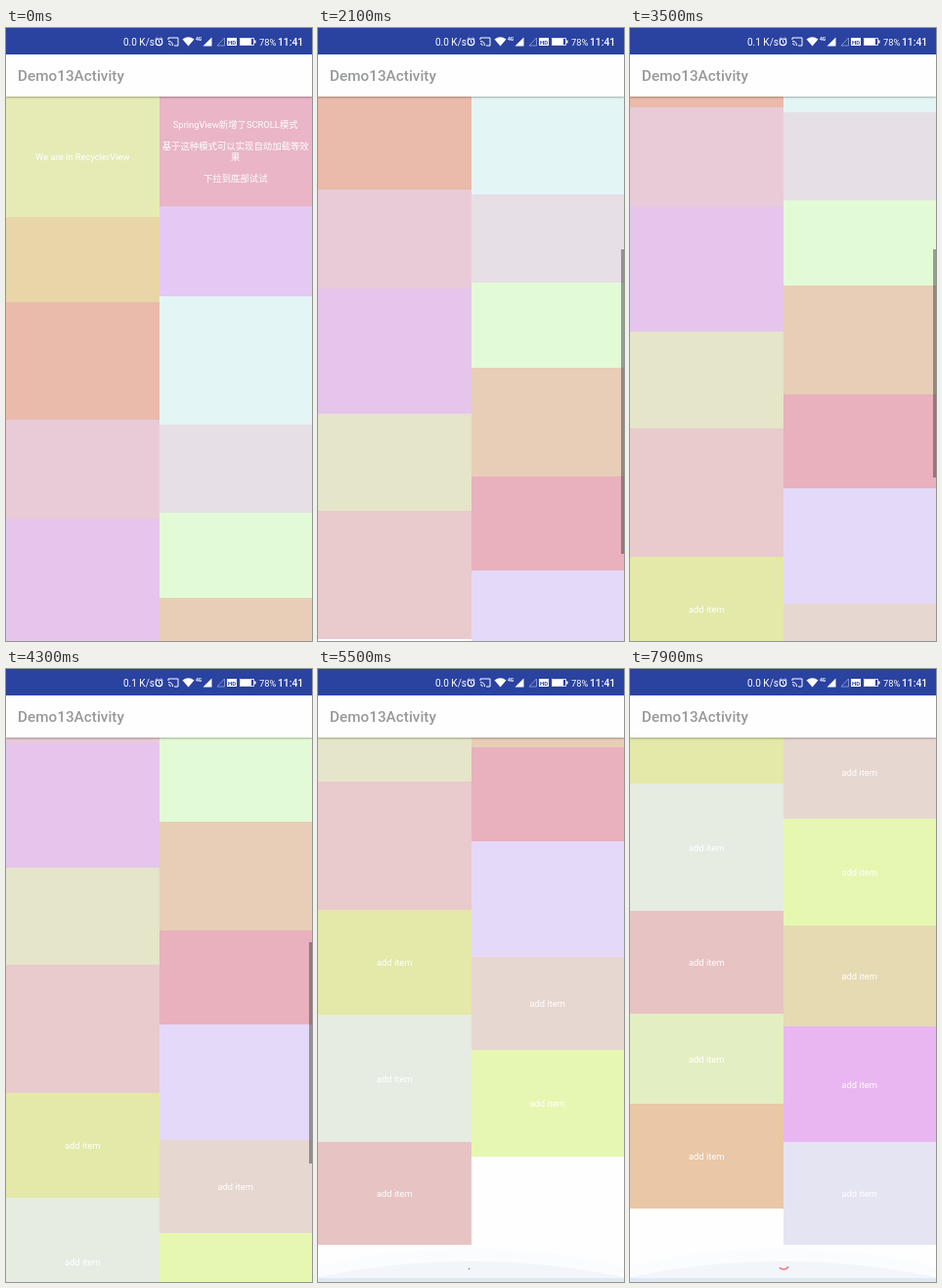
Recreate the animation shown at these times as an HTML page. Size 313x626 px, loop 8 s.

```html
<!DOCTYPE html>
<html lang="zh">
<head>
<meta charset="utf-8">
<style>
  html, body { margin: 0; width: 100%; height: 100%; overflow: hidden; background: #fdfefd; }
  body { font-family: Roboto, "Noto Sans CJK SC", "Noto Sans CJK", sans-serif; }
  #stage { position: absolute; left: 0; top: 0; width: 313px; height: 626px; overflow: hidden; }
  #list { position: absolute; left: 0; top: 0; width: 313px; }
  .item {
    position: absolute; width: 156.5px; display: flex; align-items: center; justify-content: center;
    color: #fff; font-size: 9.4px; line-height: 11px; text-align: center; white-space: pre;
  }
  #footer { position: absolute; left: 0; width: 313px; height: 38px; }
  #thumb { position: absolute; left: 310px; top: 0; width: 3px; background: rgba(50, 50, 50, .45); }
  #bar {
    position: absolute; left: 0; top: 27px; width: 313px; height: 43px; background: #fdfefd;
    box-shadow: 0 1px 2px rgba(0, 0, 0, .3);
  }
  #bar span {
    position: absolute; left: 12px; top: 0; line-height: 44px;
    font-size: 15.3px; font-weight: 500; color: #989a9a;
  }
  #status { position: absolute; left: 0; top: 0; background: #2a42a0; }
  #status text { fill: #fff; }
</style>
</head>
<body>
<div id="stage">
  <div id="list">
    <svg id="footer" viewBox="0 0 313 38">
      <path d="M0 22Q156.5 -14 313 22V38H0z" fill="#fafcfd"/>
      <path d="M0 33Q156.5 1 313 33V38H0z" fill="#f2f6fa"/>
      <rect y="34" width="313" height="4" fill="#e2e8f2"/>
      <path id="arc" fill="none" stroke-width="1.5"/>
    </svg>
  </div>
  <div id="thumb"></div>
  <div id="bar"><span>Demo13Activity</span></div>
  <svg id="status" width="313" height="27">
    <text id="speed" x="120" y="17.5" font-size="10">0.0 K/s</text>
    <g fill="none" stroke="#fff">
      <circle cx="156.5" cy="14.3" r="3.3" stroke-width="1.2"/>
      <path d="M156.5 12.3v2.2l1.5 1M152.6 11.6l2-1.8M160.4 11.6l-2-1.8"/>
      <path d="M166 12v-2h10v8h-4M166 13.5q4.500 0 4.500 4.500M166 15.800q2.200 0 2.200 2.200"/>
      <path d="M216 18h7.500v-8z" stroke="#9aa6d6" stroke-width=".8"/>
      <rect x="239.500" y="10.500" width="14" height="7" stroke-width=".8"/>
    </g>
    <g fill="#fff">
      <path d="M180.500 11.500q6-4.500 12 0l-6 7z"/>
      <path d="M201.500 18.500h9v-9z"/>
      <rect x="226" y="10" width="10" height="8"/>
      <rect x="240" y="11" width="11" height="6"/>
      <rect x="254" y="12.500" width="1.500" height="3"/>
    </g>
    <text x="194" y="13" font-size="5" font-weight="700">4G</text>
    <text x="227" y="16.500" font-size="6" font-weight="700" style="fill:#2a42a0">HD</text>
    <text x="259" y="17.500" font-size="9.4">78%</text>
    <text x="278" y="17.500" font-size="10.300" font-weight="500">11:41</text>
  </svg>
</div>
<script>
const $ = id => document.getElementById(id);
const list = $('list'), footer = $('footer'), thumb = $('thumb'), arc = $('arc'), speed = $('speed');
const LOOP = 8000, TOP = 70;

// Each column: [height, colour]
const left = [
  [123, '#e6ebb6'], [87, '#e8d6a9'], [120, '#eabaaa'], [101, '#e8cbd7'], [128, '#e6c5ec'],
  [99, '#e5e5ca'], [131, '#e9cacd'], [107, '#e4e8a8'], [130, '#e6ece2'], [105, '#e8c3c4'],
  [92, '#e4eec3'], [107, '#e9c7a7']
];
const right = [
  [112, '#e9b5c7'], [92, '#e5c9f4'], [131, '#e4f5f6'], [90, '#e6dfe6'], [87, '#e3fad6'],
  [111, '#e8ceb7'], [96, '#e9b1bd'], [118, '#e5d9f9'], [95, '#e7d7d1'], [109, '#e6f7b2'],
  [103, '#e5dab2'], [118, '#e9b6f2'], [105, '#e5e4f2']
];
const intro = 'SpringView新增了SCROLL模式\n\n基于这种模式可以实现自动加载等效\n果\n\n下拉到底部试试';

// Three batches of items; each one ends with the loading footer
const ends = [907, 1201, 1437];
const loads = [0, 3350, 5850];
const batches = [[], [], []];

function addColumn(rows, x, firstText, firstAdded, counts) {
  let y = TOP;
  rows.forEach(([h, color], i) => {
    const el = document.createElement('div');
    const batch = i < firstAdded ? 0 : i < firstAdded + counts ? 1 : 2;
    el.className = 'item';
    el.style.cssText = `left:${x}px;top:${y}px;height:${h}px;background:${color}`;
    el.textContent = i === 0 ? firstText : batch ? 'add item' : '';
    list.append(el);
    batches[batch].push(el);
    y += h;
  });
}
addColumn(left, 0, 'We are in RecyclerView', 7, 3);
addColumn(right, 156.5, intro, 8, 2);

const clamp = v => Math.max(0, Math.min(1, v));
const easeOut = u => 1 - (1 - u) ** 2;
const easeSpin = u => { const s = u ** .6; return s * s * (3 - 2 * s); };

// Flings: [start, duration, distance]
const flings = [[1750, 723, 319], [4220, 402, 294], [6700, 345, 236]];
const scrollAt = t => flings.reduce((s, [t0, d, px]) => s + px * easeOut(clamp((t - t0) / d)), 0);

// Scrollbar: [appears, starts to fade, gone]
const shows = [[1750, 2750, 3000], [3350, 3700, 4000], [4220, 4850, 5100], [5850, 6150, 6400], [6700, 7300, 7550]];
const bars = [[.667, 311], [.49, 233], [.403, 175]];

// Spinner: [start, base angle, colour]
const spins = [[2150, 0, '#e8595f'], [4230, -22, '#666a72'], [6950, 52, '#f0777a']];

function arcPath(from, to) {
  const point = a => {
    const r = a * Math.PI / 180;
    return `${(157 + 6 * Math.cos(r)).toFixed(2)} ${(19 + 6 * Math.sin(r)).toFixed(2)}`;
  };
  return `M${point(from)}A6 6 0 ${to - from > 180 ? 1 : 0} 1 ${point(to)}`;
}

function render(t) {
  const scroll = scrollAt(t);
  const stage = t < loads[1] ? 0 : t < loads[2] ? 1 : 2;
  list.style.transform = `translateY(${-Math.round(scroll)}px)`;
  for (const b of [1, 2]) {
    const o = clamp((t - loads[b]) / 120);
    batches[b].forEach(el => el.style.opacity = o);
  }

  footer.style.top = ends[stage] + 'px';
  const [start, base, color] = spins[stage];
  const p = Math.max(0, t - start) / 1333 % 1;
  const turn = base + 216 * p;
  const tail = turn + 288 * easeSpin(clamp(2 * p - 1));
  const head = turn + 288 * easeSpin(clamp(2 * p));
  arc.setAttribute('d', arcPath(tail, Math.max(head, tail + 10)));
  arc.setAttribute('stroke', color);

  const [rate, size] = bars[stage];
  const len = size - (stage === 1 ? (scroll - 319) * .064 : 0);
  const show = shows.find(([a, , z]) => t >= a && t < z);
  thumb.style.opacity = show ? 1 - clamp((t - show[1]) / (show[2] - show[1])) : 0;
  thumb.style.height = Math.round(len) + 'px';
  thumb.style.transform = `translateY(${Math.round(TOP + rate * scroll)}px)`;

  speed.textContent = t >= 2700 && t < 5100 ? '0.1 K/s' : '0.0 K/s';
}

const began = performance.now();
function tick() {
  render((performance.now() - began) % LOOP);
  requestAnimationFrame(tick);
}
tick();
</script>
</body>
</html>
```
